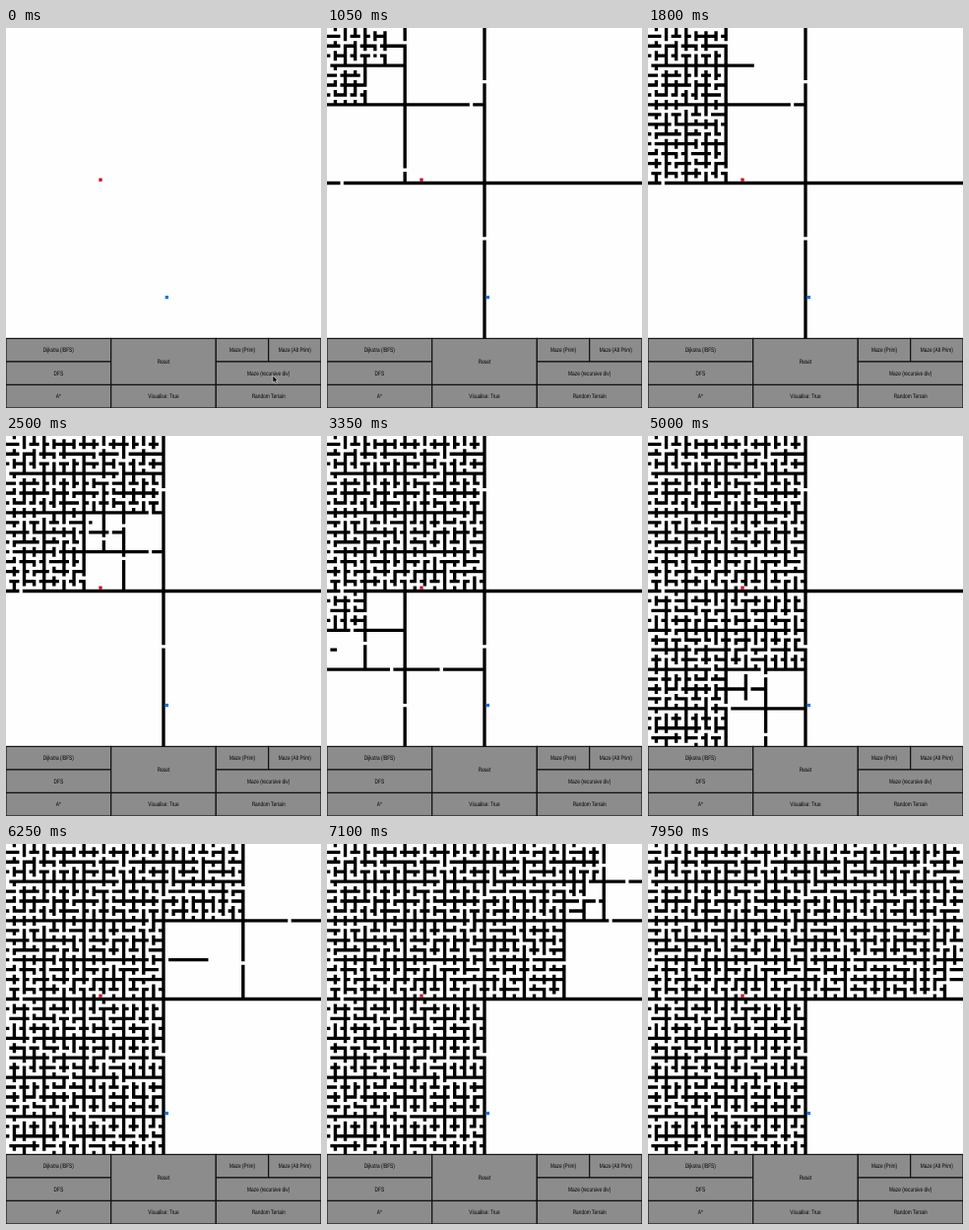
An HTML page with a canvas that plays this animation: 320x386 px, repeating every 8 s.

```html
<!DOCTYPE html>
<html lang="en">
<head>
<meta charset="utf-8">
<title>Recursive division maze</title>
<style>
  html, body { margin: 0; width: 100%; height: 100%; overflow: hidden; background: #fefefe; }
  canvas, svg { position: absolute; left: 0; top: 0; display: block; }
  text { font: 6.4px "Liberation Sans", Arial, sans-serif; text-anchor: middle; text-rendering: geometricPrecision; }
</style>
</head>
<body>
<canvas id="board" width="320" height="386"></canvas>
<svg width="320" height="386" viewBox="0 0 320 386">
  <g id="panel"></g>
  <path id="cursor" d="M0 0V7.2L1.7 5.7 2.9 8.3 4.1 7.7 3 5.2H5.2Z" fill="#000" stroke="#fff" stroke-width=".5"/>
</svg>
<script>
const LOOP = 8000, STEP = 50, START = 100, SIZE = 95;
const CELL_W = 320 / SIZE, CELL_H = 315 / SIZE;

const ctx = document.getElementById('board').getContext('2d');
const cursor = document.getElementById('cursor');

// Label, column, row, width and height on a grid of 6 by 3.
const buttons = [
  ['Dijkstra (/BFS)', 0, 0, 2, 1], ['DFS', 0, 1, 2, 1], ['A*', 0, 2, 2, 1],
  ['Reset', 2, 0, 2, 2], ['Visualise: True', 2, 2, 2, 1],
  ['Maze (Prim)', 4, 0, 1, 1], ['Maze (Alt Prim)', 5, 0, 1, 1],
  ['Maze (recursive div)', 4, 1, 2, 1], ['Random Terrain', 4, 2, 2, 1]
];
const COL = 320 / 6, ROW = 70.6 / 3, PANEL_TOP = 315.4;
document.getElementById('panel').innerHTML = buttons.map(([label, col, row, w, h]) => {
  const x = col * COL, y = PANEL_TOP + row * ROW;
  const textX = x + w * COL / 2, textY = y + h * ROW / 2 + 2.2;
  return `<rect x="${x}" y="${y}" width="${w * COL}" height="${h * ROW}" fill="#8c8c8c" stroke="#111" stroke-width="1.2"/>
    <text transform="translate(${textX} ${textY}) scale(.75 1)">${label}</text>`;
}).join('');

// Doors of the large chambers: left, right, top, bottom arm (null = closed).
const doors = {
  '0,0,95': [4, null, 16, 64],
  '0,0,47': [null, 43, 4, 43],
  '24,24,23': [null, 43, 27, 37],
  '0,48,47': [19, 34, null, 82],
  '0,48,23': [7, null, 54, 63],
  '24,72,23': [24, null, 73, 91],
  '48,0,47': [null, 85, 13, 36]
};

let seed = 2024;
function random() {
  seed = (seed * 1664525 + 1013904223) >>> 0;
  return seed / 4294967296;
}

// Smaller walls end at every third cell, so a door there moves back by one.
function pickDoor(from, length) {
  const door = from + Math.floor(random() * length);
  return door % 3 === 2 ? door - 1 : door;
}

function randomDoors(x, y, half) {
  const picked = [x, x + half + 1, y, y + half + 1].map(from => pickDoor(from, half));
  picked[Math.floor(random() * 4)] = null;
  return picked;
}

const walls = [];
function divide(x, y, size) {
  if (size < 5) return;
  const half = size >> 1, midX = x + half, midY = y + half;
  const [left, right, top, bottom] = doors[[x, y, size]] || randomDoors(x, y, half);
  for (let i = x; i < x + size; i++) walls.push([i, midY, i === left || i === right]);
  for (let j = y; j < y + size; j++) {
    if (j !== midY) walls.push([midX, j, j === top || j === bottom]);
  }
  for (const cx of [x, midX + 1]) {
    for (const cy of [y, midY + 1]) divide(cx, cy, half);
  }
}
divide(0, 0, SIZE);

// The builder slows down very slightly as the maze fills.
function wallCount(step) {
  return Math.round(23.95 * step - 0.0021 * step * step);
}

function fillCells(color, cells) {
  ctx.fillStyle = color;
  ctx.beginPath();
  for (const [x, y, open] of cells) {
    if (!open) ctx.rect(x * CELL_W, y * CELL_H, CELL_W, CELL_H);
  }
  ctx.fill();
}

function drawBoard(step) {
  ctx.fillStyle = '#fefefe';
  ctx.fillRect(0, 0, 320, 386);
  fillCells('#000', walls.slice(0, wallCount(step)));
  fillCells('#c8102e', [[28, 46]]);
  fillCells('#0a74f0', [[48, 82]]);
}

let shownStep = -1;
function draw(time) {
  const step = Math.max(0, Math.floor((time - START) / STEP) + 1);
  if (step !== shownStep) drawBoard(shownStep = step);
  const leave = Math.max(0, (time - START) / 300);
  cursor.setAttribute('transform', `translate(${271 + 50 * leave} ${353 + 10 * leave})`);
  cursor.style.display = leave < 1 ? '' : 'none';
}

function tick() {
  draw(performance.now() % LOOP);
  requestAnimationFrame(tick);
}
tick();
</script>
</body>
</html>
```
